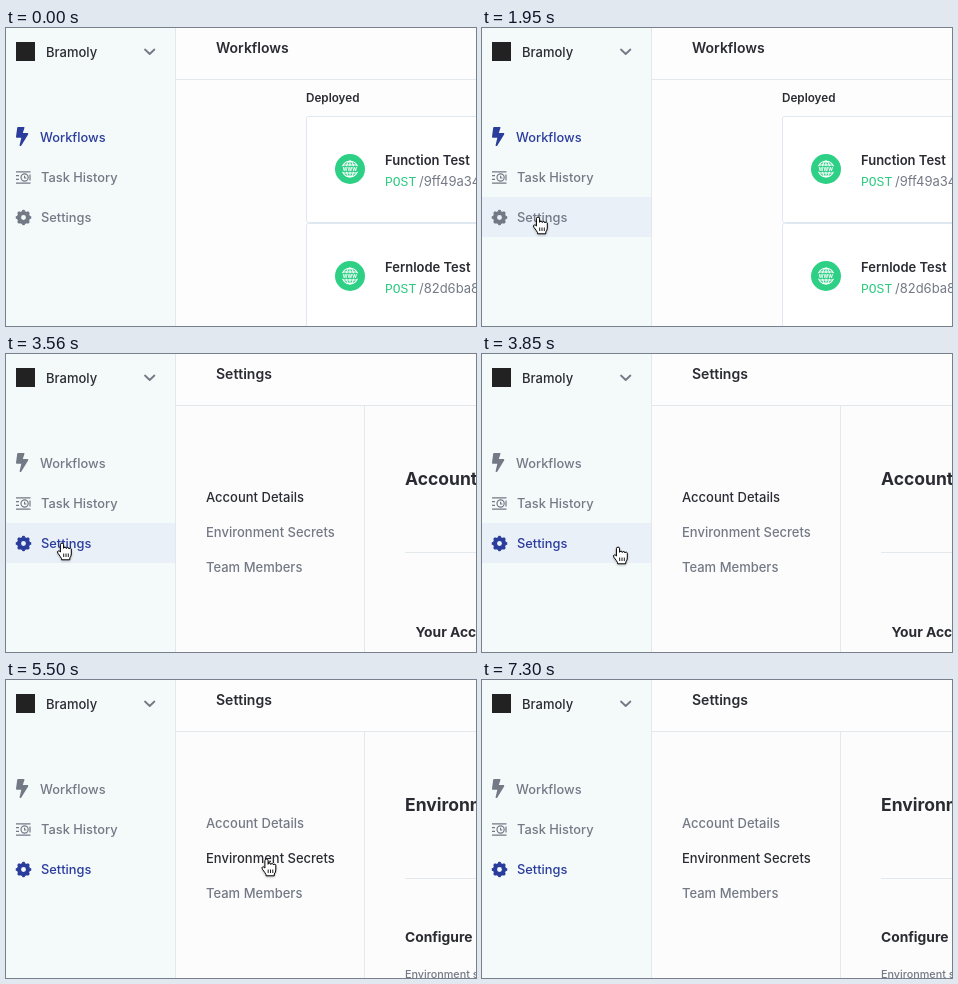
Write an HTML page that moves like this. It is 470 px wide and 298 px high and loops after 7750 ms.

```html
<!DOCTYPE html>
<html lang="en">
<head>
<meta charset="utf-8">
<title>Workflow settings</title>
<style>
  html, body { margin: 0; width: 100%; height: 100%; overflow: hidden; background: #fdfdfd; }
  svg { display: block; }
  text { font: 500 13px Inter, sans-serif; fill: #737985; white-space: pre; }
  .dark { fill: #2b2c33; }
  .bold { font-weight: 600; fill: #2b2c33; }
  .title { font-size: 14px; }
  .label { font-size: 11.7px; }
  .heading { font-size: 17.5px; font-weight: 700; }
  .section { font-size: 13.8px; font-weight: 700; }
  .path { font-weight: 400; }
  .small { font-size: 10.8px; }
  .verb { font: 400 13px "Liberation Mono", monospace; fill: #2dcb80; }
  .line { stroke: #e3e8ec; fill: none; }
  .card { fill: #fff; stroke: #dfe8f0; }
  .nav { color: #737985; }
  .nav.on { color: #2a3c9c; }
  .nav text { fill: currentColor; font-size: 12.85px; }
  .nav .stroke { fill: none; stroke: currentColor; }
  .tab.on text { fill: #2b2c33; }
  .www { font-size: 5.6px; font-weight: 700; fill: #fff; text-anchor: middle; }
</style>
</head>
<body>
<svg width="470" height="298" viewBox="0 0 470 298">
  <defs>
    <g id="globe">
      <circle r="15" fill="#2dd085"/>
      <g fill="none" stroke="#fff" stroke-width="1.1">
        <circle r="8"/>
        <ellipse rx="3.7" ry="8"/>
        <path d="M0-8V8M-7-4H7M-7 4H7"/>
      </g>
      <path d="M-9.5-2.8H9.5V2.8H-9.5Z" fill="#2dd085"/>
      <text class="www" y="1.6">www</text>
    </g>
    <filter id="shadow" x="-50%" y="-50%" width="200%" height="200%">
      <feDropShadow dx="0" dy="1" stdDeviation="1" flood-opacity=".25"/>
    </filter>
  </defs>

  <rect width="470" height="298" fill="#fdfdfd"/>
  <rect width="169" height="298" fill="#f4f9fa"/>
  <rect id="hover" y="169" width="169" height="40" fill="#e9f0f8"/>
  <path class="line" d="M169.5 0V298M170 51.5H470"/>

  <rect x="10" y="14" width="19" height="19" fill="#222"/>
  <text class="dark" x="40" y="29">Bramoly</text>
  <path d="M139 21.5l4.7 4.5 4.7-4.5" fill="none" stroke="#737985" stroke-width="1.8" stroke-linecap="round" stroke-linejoin="round"/>

  <g class="nav" id="flows">
    <path d="M12 99H18Q18.6 99 18.4 99.9L16.8 105H21.6Q22.7 105.3 22.1 106.4L15.2 117.7Q14 118.6 13.6 117.2L15.3 109.8H10.8Q9.9 109.7 10 108.7L11.2 99.8Q11.3 99 12 99Z" fill="currentColor"/>
    <text x="34" y="114">Workflows</text>
  </g>
  <g class="nav">
    <path class="stroke" stroke-width="1.2" d="M10 143.8H24.5M10 155.2H24.5M10 147.6H13M10 151.4H13M24 146.5V152.5M18.6 147.8V150H20.4"/>
    <circle class="stroke" stroke-width="1.2" cx="18.6" cy="149.5" r="3.6"/>
    <text x="35" y="154">Task History</text>
  </g>
  <g class="nav" id="settings">
    <circle class="stroke" cx="17.5" cy="189.5" r="4.5" stroke-width="4.1"/>
    <circle class="stroke" cx="17.5" cy="189.5" r="6.6" stroke-width="2.3" pathLength="16" stroke-dasharray="1" stroke-dashoffset=".5"/>
    <text x="35" y="194">Settings</text>
  </g>

  <g id="flowPage">
    <text class="bold title" x="210" y="25">Workflows</text>
    <text class="bold label" x="300" y="74">Deployed</text>
    <rect class="card" x="300.5" y="88.5" width="200" height="106" rx="2"/>
    <rect class="card" x="300.5" y="195.5" width="200" height="120" rx="2"/>
    <use href="#globe" x="344" y="141"/>
    <text class="bold" x="379" y="137">Function Test</text>
    <text class="verb" x="379" y="158">POST</text>
    <text class="path" x="413" y="158">/9ff49a34</text>
    <use href="#globe" x="344" y="248"/>
    <text class="bold" x="379" y="244">Fernlode Test</text>
    <text class="verb" x="379" y="265">POST</text>
    <text class="path" x="413" y="265">/82d6ba81</text>
  </g>

  <g id="settingsPage">
    <rect x="170" y="52" width="300" height="246" fill="#fcfcfc"/>
    <text class="bold title" x="210" y="25">Settings</text>
    <path class="line" d="M358.5 52V298M399 198.5H470"/>
    <g class="tab" id="accountTab"><text x="200" y="148">Account Details</text></g>
    <g class="tab" id="secretsTab"><text x="200" y="183">Environment Secrets</text></g>
    <text x="200" y="218">Team Members</text>
    <g id="accountPane">
      <text class="bold heading" x="399" y="131">Account Details</text>
      <text class="bold section" x="409.5" y="283">Your Account</text>
    </g>
    <g id="secretsPane">
      <text class="bold heading" x="399" y="131">Environment Secrets</text>
      <text class="bold section" x="399" y="262">Configure</text>
      <text class="small" x="399" y="298">Environment secrets</text>
    </g>
  </g>

  <g id="cursor" filter="url(#shadow)">
    <path id="arrow" d="M0 0V14.5L3.2 11.5 5.6 17 8 16 5.7 10.7H10.2Z" fill="#000" stroke="#fff" stroke-width="1.6" paint-order="stroke"/>
    <g id="hand" stroke="#000" stroke-linejoin="round">
      <path fill="#fff" d="M-1.6 9V1.7a1.6 1.6 0 0 1 3.2 0V5.3a1.35 1.2 0 0 1 2.7 .2a1.3 1.2 0 0 1 2.6 .5a1.2 1.2 0 0 1 2.4 .9V11q0 2.2-1.5 4V16.8H-.4V15.8q-1-2.2-3.6-5.4q-1.2-1.9 .2-2.5q1-.3 2.2 1.1Z"/>
      <path stroke-width=".9" d="M1.7 10.5V14M4 10.5V14M6.3 10.5V14"/>
    </g>
  </g>
</svg>
<script>
const LOOP = 7750;
const $ = id => document.getElementById(id);
const show = (id, on) => { $(id).style.display = on ? "" : "none"; };
const mark = (id, on) => $(id).classList.toggle("on", on);

const easeIn = p => p * p;
const easeOut = p => 1 - (1 - p) ** 2;
const easeOutCubic = p => 1 - (1 - p) ** 3;
const easeInOut = p => p * p * (3 - 2 * p);

// start, end, from, to, easing of x, easing of y
const moves = [
  [900, 1420, [209, 298], [55, 192], easeOutCubic, easeOut],
  [1890, 1950, [56, 189], [56, 189], easeIn],
  [3560, 3850, [56, 189], [136, 193], easeInOut],
  [4030, 4550, [136, 193], [260.5, 179], easeInOut],
  [6160, 6560, [260.5, 179], [320, 214], easeIn],
  [6560, 6890, [320, 214], [405, 268], easeOut],
  [6950, 7300, [405, 268], [434, 300], easeIn]
];

function cursorAt(t) {
  const [start, end, a, b, ex, ey = ex] = moves.findLast(m => t >= m[0]) || moves[0];
  const p = Math.min(1, Math.max(0, (t - start) / (end - start)));
  return [a[0] + (b[0] - a[0]) * ex(p), a[1] + (b[1] - a[1]) * ey(p)];
}

function draw() {
  const t = performance.now() % LOOP;
  const [x, y] = cursorAt(t);
  const inSettings = t >= 2600, inSecrets = t >= 5500;
  const pointing = t >= 1890 && t < 6640;

  show("flowPage", !inSettings);
  show("settingsPage", inSettings);
  show("accountPane", !inSecrets);
  show("secretsPane", inSecrets);
  mark("flows", !inSettings);
  mark("settings", inSettings);
  mark("accountTab", !inSecrets);
  mark("secretsTab", inSecrets);

  show("hover", pointing && x < 169);
  show("cursor", t >= 900 && t < 7300);
  show("hand", pointing);
  show("arrow", !pointing);
  $("cursor").setAttribute("transform", `translate(${x.toFixed(1)} ${y.toFixed(1)})`);
  requestAnimationFrame(draw);
}
draw();
</script>
</body>
</html>
```
